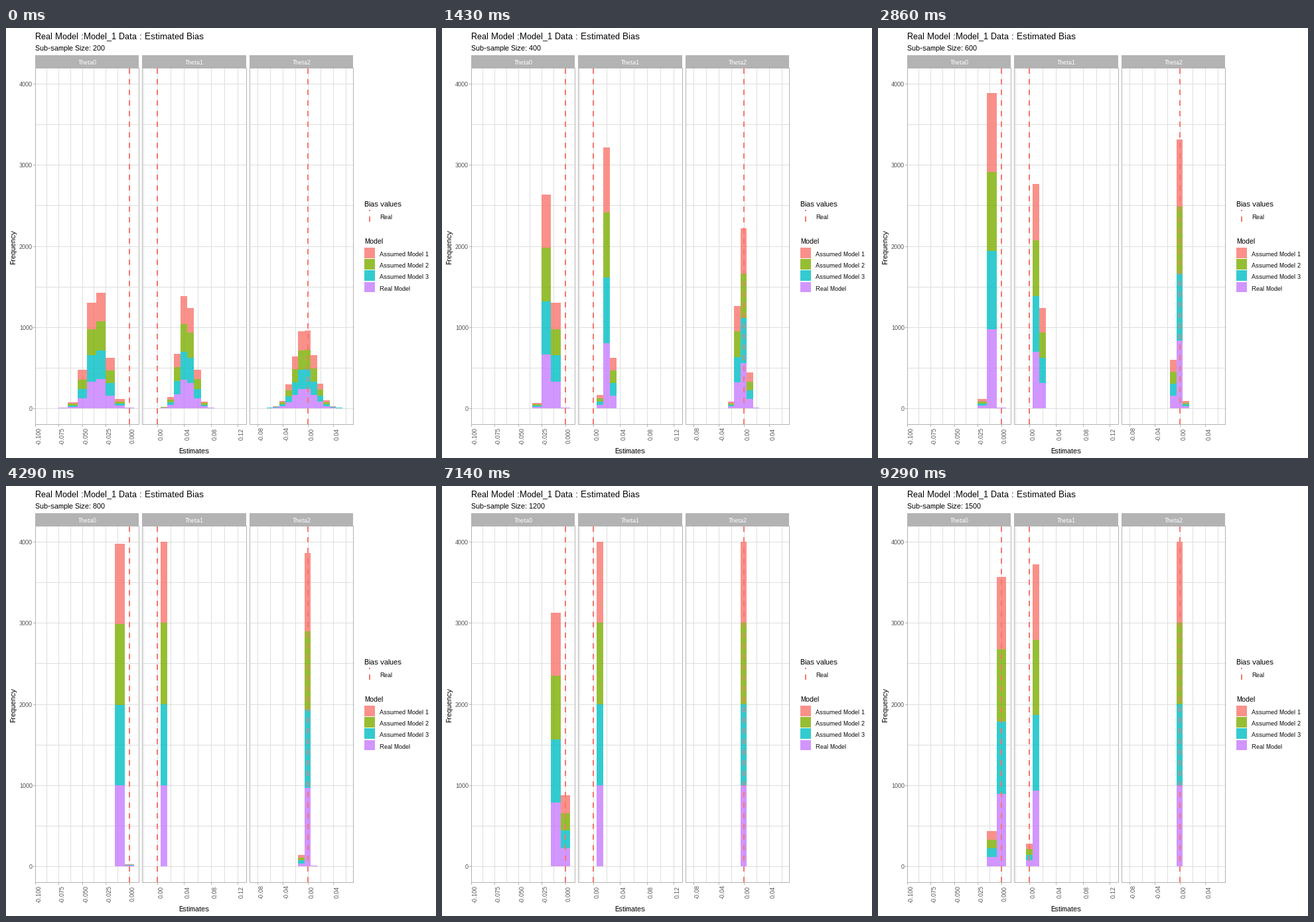
Recreate the animation shown at these times as a matplotlib script. Size 648x648 px, loop 10000 ms.

```python
from collections import namedtuple
from math import erf, exp, sqrt

import matplotlib.pyplot as plt
from matplotlib.animation import FuncAnimation
from matplotlib.patches import Rectangle

STAGE = 648
LOOP, FRAMES = 10000, 250
SIZES = range(200, 1501, 100)
plt.rcParams.update({
    "font.family": "Liberation Sans",
    "text.hinting": "native",
    "text.hinting_factor": 1,
})

RED, GREEN, CYAN, PURPLE = "#F8766D", "#7CAE00", "#00BFC4", "#C77CFF"
STACK = (PURPLE, CYAN, GREEN, RED)  # bottom to top
GRID, BORDER, TICK_TEXT = "#DEDEDE", "#B3B3B3", "#4D4D4D"
TOP, BOTTOM, STRIP_TOP = 60, 597, 41
BIN, TOTAL = 0.01, 4000

# zero: x of value 0, scale: pixels per unit, ticks: range in steps,
# mean and spread: parameters of the bias distribution (see below)
Panel = namedtuple("Panel", "name left right zero scale step ticks fmt mean spread")
PANELS = [
    Panel("Theta0", 44, 200, 186.1, 1420, 0.025, (-4, 0), "%.3f",
          (-6.585, -42), (0.63, 1.37, 475)),
    Panel("Theta1", 205, 362, 228.2, 1014, 0.04, (0, 3), "%.2f",
          (8.33, 80), (0.55, 1.55, 370)),
    Panel("Theta2", 367, 523, 455.2, 950, 0.04, (-2, 1), "%.2f",
          (-0.96, 0), (1.1, 2.05, 460)),
]

fig = plt.figure(figsize=(STAGE / 72, STAGE / 72), dpi=72, facecolor="white")
ax = fig.add_axes([0, 0, 1, 1])
ax.set_xlim(0, STAGE)
ax.set_ylim(STAGE, 0)
ax.axis("off")


def y_of(count):
    return int(573.1 - count * 0.12205)


def rect(x0, y0, x1, y1, color, z=1, alpha=1):
    patch = Rectangle((x0, y0), x1 - x0, y1 - y0, fc=color, lw=0, alpha=alpha,
                      zorder=z, antialiased=False)
    return ax.add_patch(patch)


def hline(x0, x1, y, color, z=1):
    rect(x0, y, x1, y + 1, color, z)


def vline(x, y0, y1, color, z=1):
    rect(int(x), y0, int(x) + 1, y1, color, z)


def label(x, y, s, size=9, color="black", ha="left", rot=0):
    return ax.text(x, y, s, size=size, color=color, ha=ha, va="baseline",
                   rotation=rot, rotation_mode="anchor", zorder=6)


def dashes(x, low, high):
    x = round(x)
    while low > high:
        rect(x - 1, max(low - 8, high), x + 1, low, RED, 4)
        low -= 16


def draw_panel(p):
    first, last = p.ticks
    for count in range(0, TOTAL + 1, 500):
        hline(p.left, p.right, y_of(count), GRID)
    for k in range(2 * first - 2, 2 * last + 3):
        x = p.zero + k * p.step / 2 * p.scale
        if p.left < x < p.right:
            vline(x, TOP, BOTTOM, GRID)
    ticks = [p.fmt % (k * p.step) for k in range(first, last + 1)]
    middle = 602 + 2.5 * max(map(len, ticks)) - (p.ticks[0] < 0) * 2.5
    for k, text in enumerate(ticks, first):
        x = p.zero + k * p.step * p.scale
        vline(x, BOTTOM, BOTTOM + 4, BORDER, 5)
        label(x + 8, middle, text, color=TICK_TEXT, ha="center", rot=90)
    dashes(p.zero, BOTTOM, TOP + 1)
    for y in (TOP, BOTTOM):
        hline(p.left, p.right + 1, y, BORDER, 5)
    for x in (p.left, p.right):
        vline(x, TOP, BOTTOM + 1, BORDER, 5)
    rect(p.left, STRIP_TOP, p.right, TOP, BORDER, 5)
    label((p.left + p.right + 1) / 2, 55, p.name, color="white", ha="center")


for panel in PANELS:
    draw_panel(panel)
for count in range(0, TOTAL + 1, 1000):
    y = y_of(count)
    hline(41, 44, y, BORDER, 5)
    label(40, y + 4, str(count), color=TICK_TEXT, ha="right")

label(44, 16, "Real Model :Model_1 Data : Estimated Bias", 13)
subtitle = label(44, 34, "", 11)
label(283, 641, "Estimates", 11, ha="center")
label(14, 329.5, "Frequency", 11, ha="center", rot=90)

label(540, 269, "Bias values", 11)
dashes(548, 292, 274)
label(563, 288, "Real")
label(540, 325, "Model", 11)
KEYS = ("Assumed Model 1", "Assumed Model 2", "Assumed Model 3", "Real Model")
for i, (name, color) in enumerate(zip(KEYS, reversed(STACK))):
    y = 330.8 + 17.28 * i
    rect(540, round(y), 556, int(y + 16.28), color, 2, 0.8)
    label(563, round(y) + 13, name)


def share_below(p, value, size):
    """Share of the estimates below value: bias and spread shrink with size."""
    a, b = p.mean
    c, d, decay = p.spread
    mean = (a + b / size) / size
    sd = (c + d * exp((SIZES[0] - size) / decay)) / size
    return (1 + erf((value - mean) / (sd * sqrt(2)))) / 2


bars = []


def draw_bars(p, size):
    for k in range(-10, 14):
        left, right = (k - 0.5) * BIN, (k + 0.5) * BIN
        count = TOTAL * (share_below(p, right, size) - share_below(p, left, size))
        x0, x1 = int(p.zero + left * p.scale), int(p.zero + right * p.scale)
        for i, color in enumerate(STACK):
            low, high = y_of(count * i / 4), y_of(count * (i + 1) / 4)
            if low > high:
                bars.append(rect(x0, high, x1, low, color, 3, 0.8))


def show(size):
    while bars:
        bars.pop().remove()
    subtitle.set_text(f"Sub-sample Size: {size}")
    for p in PANELS:
        draw_bars(p, size)


def update(i):
    n = len(SIZES)
    show(SIZES[(n * i + n - 1) // FRAMES])
    return [subtitle, *bars]


anim = FuncAnimation(fig, update, frames=FRAMES, interval=LOOP // FRAMES,
                     init_func=lambda: update(0), repeat=True, repeat_delay=0)
plt.show()
```
